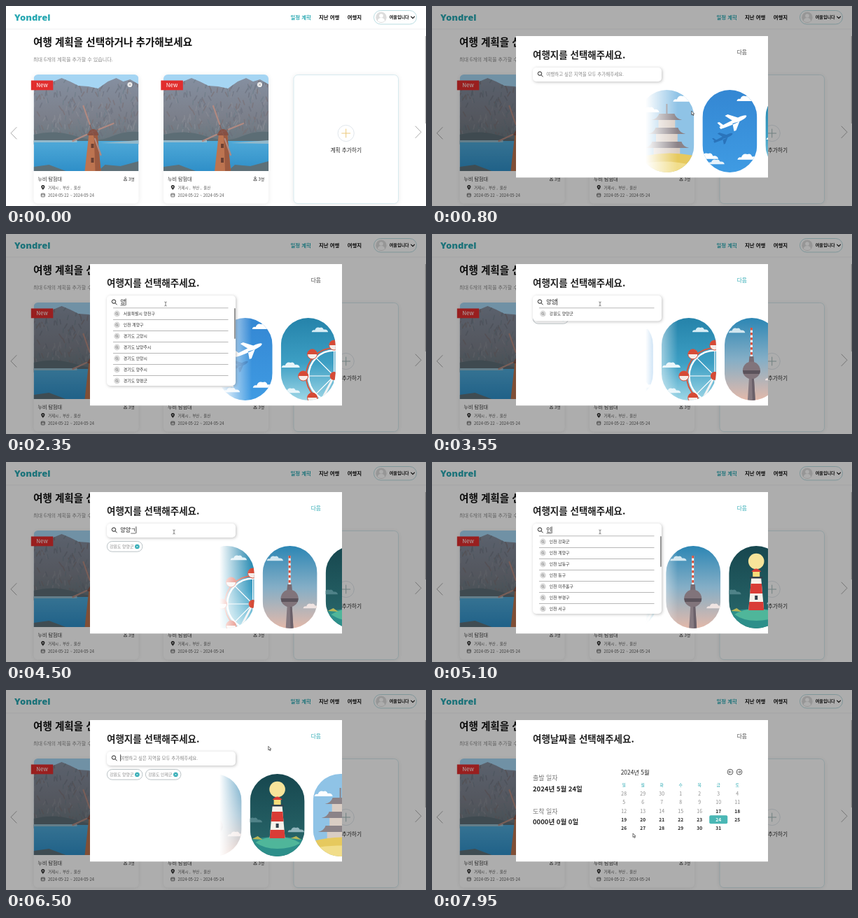
An HTML page for the animation above (8 s loop, 600x286 px).

```html
<!DOCTYPE html>
<html lang="ko">
<head>
<meta charset="utf-8">
<title>여행 계획</title>
<style>
  html, body { margin: 0; width: 100%; height: 100%; overflow: hidden; background: #fff; }
  svg { display: block; width: 100%; height: 100%; }
  text { font-family: 'Noto Sans CJK KR', 'Noto Sans CJK', 'Noto Sans', sans-serif; white-space: pre; }
  .logo { font-family: 'Open Sans', 'Noto Sans', sans-serif; }
  .card { filter: drop-shadow(0 1px 3px rgba(0, 0, 0, .09)); }
  .field { filter: drop-shadow(1px 1px 2px rgba(0, 0, 0, .25)); }
</style>
</head>
<body>
<svg viewBox="0 0 600 286">
  <defs>
    <linearGradient id="fade"><stop stop-color="#fff"/><stop offset="1" stop-color="#fff" stop-opacity="0"/></linearGradient>
    <linearGradient id="planeSky" x2="0" y2="1"><stop stop-color="#3487d3"/><stop offset="1" stop-color="#3f9be3"/></linearGradient>
    <linearGradient id="wheelSky" x2="0" y2="1"><stop stop-color="#2583aa"/><stop offset=".55" stop-color="#3d9fc4"/><stop offset="1" stop-color="#9ed6e6"/></linearGradient>
    <linearGradient id="towerSky" x2="0" y2="1"><stop stop-color="#2c86b4"/><stop offset=".5" stop-color="#84aec6"/><stop offset="1" stop-color="#e3b9aa"/></linearGradient>
    <linearGradient id="nightSky" x2="0" y2="1"><stop stop-color="#17474f"/><stop offset="1" stop-color="#2a6a6d"/></linearGradient>
    <linearGradient id="hills" x2="0" y2="1"><stop stop-color="#858fa0"/><stop offset=".6" stop-color="#7b7f8a"/><stop offset="1" stop-color="#66757c"/></linearGradient>
    <linearGradient id="water" x2="0" y2="1"><stop stop-color="#4fa9d8"/><stop offset="1" stop-color="#2f8fc8"/></linearGradient>
    <clipPath id="pill"><rect width="78" height="118" rx="39"/></clipPath>
    <clipPath id="track"><rect x="305" y="110" width="175" height="135"/></clipPath>
    <clipPath id="photo"><path d="M0 138V6a6 6 0 0 1 6-6h138a6 6 0 0 1 6 6v132z"/></clipPath>
    <path id="ridge" d="M0 22L14 14 28 10 40 5 52 10 64 16 78 17 92 20 106 10 118 5 128 10 138 7 150 14V100H0z"/>
    <clipPath id="slopes"><use href="#ridge"/></clipPath>
    <path id="cloud" d="M0 8q1-4 5-3q2-6 8-4q4-2 6 3q6-1 7 4z"/>
    <path id="jet" d="M-19 8Q-6 1 11-7q8-3 9-1q0 3-8 7Q-4 7-17 11zM0-1L-11-8l4-2L9-5zM0 3l2 11 3-1 5-13zM-16 8l-6-6 3-1 7 5z"/>
  </defs>
  <g id="page"></g>
  <g id="dialog"></g>
</svg>
<script>
const LOOP = 8000, TICK = 50, OPEN = 400, DATES = 6850, PICK = 7450;
const TEAL = '#2ba9b3';

const text = (x, y, size, str, fill = '#222', weight = 400, anchor = 'start', cls = '') =>
  `<text x="${x}" y="${y}" font-size="${size}" fill="${fill}" font-weight="${weight}" text-anchor="${anchor}" class="${cls}">${str}</text>`;
const rect = (x, y, w, h, fill, rx = 0, extra = '') =>
  `<rect x="${x}" y="${y}" width="${w}" height="${h}" rx="${rx}" fill="${fill}" ${extra}/>`;
const circle = (x, y, r, fill, extra = '') => `<circle cx="${x}" cy="${y}" r="${r}" fill="${fill}" ${extra}/>`;
const path = (d, fill) => `<path d="${d}" fill="${fill}"/>`;
const line = (d, stroke, width = 1) =>
  `<path d="${d}" fill="none" stroke="${stroke}" stroke-width="${width}" stroke-linecap="round" stroke-linejoin="round"/>`;
const at = (x, y, body, scale = 1) => `<g transform="translate(${x} ${y}) scale(${scale})">${body}</g>`;
const use = (id, x, y, fill, scale = 1) => at(x, y, `<use href="#${id}" fill="${fill}"/>`, scale);
const range = n => [...Array(n).keys()];

// ---- Page behind the dialog ----
function ruggedSlopes() {
  let seed = 7;
  const random = () => (seed = seed * 16807 % 2147483647) / 2147483647;
  const tones = ['#6a6f7c', '#8d8f98', '#7a6f72', '#6d7d88'];
  return '<g clip-path="url(#slopes)" opacity=".6">' + range(260).map(i => {
    const x = random() * 150, y = 5 + random() * 88, lean = random() * 8 - 4;
    return line(`M${x.toFixed(1)} ${y.toFixed(1)}l${lean.toFixed(1)} 6`, tones[i % 4], 1.6);
  }).join('') + '</g>';
}

function windmillPhoto() {
  const blades = [[-13, -37], [30, -12], [12, 33], [-28, 13]].map(([x, y]) =>
    line(`M84 82l${x} ${y}`, '#8a5a50', 1) +
    line(`M${84 + x * .3} ${82 + y * .3}L${84 + x} ${82 + y}`, '#b08a82', 2.2)).join('');
  return `<g clip-path="url(#photo)">` +
    rect(0, 0, 150, 138, '#a5d5f3') + use('ridge', 0, 0, 'url(#hills)') + ruggedSlopes() +
    path('M0 86Q30 78 60 88T110 89T150 82V100H0z', '#5c6d75') +
    rect(0, 95, 150, 43, 'url(#water)') +
    path('M0 94h62v3H0zM96 98l54-4v5z', '#93b9cb') +
    path('M92 138l10-9 22 2 26-7v14zM0 132l22-3 24 9H0z', '#5d7078') +
    path('M79 84h12l5 54H73z', '#bd7450') + path('M86 84h5l5 54h-8z', '#9c5a40') +
    path('M77 87q2-9 8-9t8 9z', '#875043') +
    rect(82, 99, 4, 6, '#6a4034') + rect(82, 119, 4, 7, '#6a4034') +
    blades + '</g>';
}

function planCard(x) {
  return at(x, 98,
    rect(0, 0, 150, 184.5, '#fff', 6, 'class="card"') + windmillPhoto() +
    circle(137.5, 14.5, 3.5, '#f4f4f4') + line('M136.200 13.200l2.600 2.600m0-2.600l-2.600 2.600', '#888', .7) +
    rect(-3.7, 8.5, 31.5, 13.8, '#e12d2d') + text(12, 18.4, 8, 'New', '#fff', 500, 'middle') +
    text(6, 152, 7.1, '누비 탐험대', '#333', 500) +
    circle(131, 147.6, 1.2, 'none', 'stroke="#333" stroke-width=".7"') +
    line('M128.800 151.300q0-1.900 2.200-1.900t2.200 1.900z', '#333', .7) +
    text(135.5, 151.5, 5.9, '3명', '#333') +
    path('M13.3 165q-2.6-3-2.6-4.3a2.6 2.6 0 0 1 5.2 0q0 1.3-2.6 4.3z', '#333') + circle(13.3, 160.7, .9, '#fff') +
    text(20.5, 164, 5.4, '거제시 ,  부산 ,  울산', '#555') +
    rect(10.8, 170.2, 5, 4.6, 'none', .6, 'stroke="#444" stroke-width=".8"') + line('M11 172h4.6', '#444', .8) +
    text(20.5, 174.6, 5.8, '2024-05-22 ~ 2024-05-24', '#555'));
}

function page(plusColor) {
  return rect(0, 0, 600, 286, '#fff') + rect(0, 32.5, 600, 1, '#f0f0f2') +
    text(12, 21.3, 13, 'Yondrel', TEAL, 800, 'start', 'logo') +
    text(406.5, 19, 7.4, '일정 계획', TEAL, 700) +
    text(447, 19, 7.4, '지난 여행', '#111', 700) +
    text(487.7, 19, 7.4, '여행지', '#111', 700) +
    rect(525.5, 6.5, 61, 19.5, '#fff', 9.7, 'stroke="#a9d3da" stroke-width=".8"') +
    circle(536, 16.2, 7.7, '#ddd') + circle(536, 14, 2.8, '#fff') + path('M531 21.5q0-4.5 5-4.5t5 4.5q-5 3-10 0z', '#fff') +
    text(547.7, 18.4, 6.1, '여울입니다', '#111', 700) + line('M578.700 15.200l2.400 2.400 2.400-2.400', '#111', 1.2) +
    text(39, 57.2, 14.6, '여행 계획을 선택하거나 추가해보세요', '#111', 700) +
    text(39, 79.4, 7.1, '최대 6개의 계획을 추가할 수 있습니다.', '#8a8a8a') +
    planCard(39.5) + planCard(225) +
    rect(411, 98.5, 149.5, 184, '#fff', 6, 'stroke="#cfe6ec" stroke-width=".8" class="card"') +
    circle(485.7, 182, 11.6, '#fff', 'stroke="#d9e0e6" stroke-width=".8"') +
    line('M479.700 182h12m-6-6v12', plusColor, 1) +
    text(485.7, 209.3, 7.7, '계획 추가하기', '#222', 500, 'middle') +
    line('M15 173.500l-8 8.300 8 8.300M585 172l8 8.300-8 8.300', '#aaa', 1) +
    rect(598.8, 43, 1.2, 125, '#bdbdbd');
}

// ---- Carousel of round cards ----
const pagodaTier = i => {
  const y = 34 + 20 * i, w = 17 + 5 * i;
  return rect(39 - w * .7, y + 8, w * 1.4, 12, '#d9cdc4') +
    path(`M${39 - w - 5} ${y + 9}q9-2 11-9h${2 * w - 12}q2 7 11 9z`, '#8b8388');
};
const scenes = [
  () => rect(0, 0, 78, 118, '#8fc3e6') + use('cloud', 48, 8, '#fff', 1.1) + use('cloud', 2, 24, '#fff') +
    rect(38, 20, 2, 16, '#8b8388') + range(3).map(pagodaTier).join('') +
    path('M0 96q39-10 78-2v24H0z', '#e6c95e') + path('M0 106q39-8 78 2v10H0z', '#f1dd8a'),
  () => rect(0, 0, 78, 118, 'url(#planeSky)') + use('cloud', 49, 8, '#fff') + use('cloud', -6, 90, '#fff', 1.1) +
    use('cloud', 8, 99, '#e6f2fb', .9) + use('cloud', 50, 91, '#fff', 1.1) +
    use('jet', 29, 68, '#2a74bb', .7) + use('jet', 43, 45, '#fff'),
  () => rect(0, 0, 78, 118, 'url(#wheelSky)') + use('cloud', 44, 13, '#d7edf5', .9) + use('cloud', 1, 63, '#e7f5fa') +
    use('cloud', 4, 100, '#e7f5fa', .9) +
    line('M76 83L58 118', '#f3f3f3', 3) +
    circle(76, 83, 40, 'none', 'stroke="#d8563f" stroke-width="2"') +
    circle(76, 83, 36.5, 'none', 'stroke="#fff" stroke-width="2.5"') +
    range(8).map(i => {
      const a = i * Math.PI / 4, c = Math.cos(a), s = Math.sin(a);
      return line(`M76 83L${76 + 38 * c} ${83 + 38 * s}`, '#fff', 1.2) +
        at(76 + 44 * c, 83 + 44 * s, circle(0, 0, 7, '#f6ece8', 'stroke="#d64a36" stroke-width="1"') + path('M-7 0a7 7 0 0 1 14 0z', '#d64a36'));
    }).join('') + circle(76, 83, 6, '#d64a36'),
  () => rect(0, 0, 78, 118, 'url(#towerSky)') + use('cloud', 6, 14, '#d2e6ef', .9) + use('cloud', 58, 82, '#f0e4e2', .9) +
    rect(37, 14, 3, 42, '#fff') + range(6).map(i => rect(37, 14 + i * 7, 3, 3.6, '#d5523f')).join('') +
    path('M35.5 55h6l1 11h-8z', '#776b73') + circle(38.5, 75, 12.5, '#81747b') +
    path('M26 75h25a12.5 12.5 0 0 1-1 5H27z', '#5b525b') +
    path('M35 87h7l2 31H33z', '#857980') + path('M39 87h3l2 31h-4z', '#6a6069'),
  () => rect(0, 0, 78, 118, 'url(#nightSky)') + circle(39, 22, 11.3, '#f7e49a') +
    use('cloud', 54, 76, '#8fb3ba', .9) + use('cloud', -6, 62, '#4f8288', .9) +
    path('M0 94q39-8 78 0v24H0z', '#2d8f8a') + path('M8 98q12-8 31-8t33 9q-14 8-33 8T8 98z', '#4fb69a') +
    path('M3 93l8-4 7 5zM58 92l8-3 7 5z', '#b9b657') +
    path('M32 46h14l4 46H28z', '#f6f1ea') + path('M31.3 54h15.4l1.2 14H30zM29 80h20l1 12H28z', '#d93c36') +
    rect(30, 44, 18, 2.5, '#333f4b') + rect(34, 37, 10, 7, '#f7dc7a') + path('M32 37q7-9 14 0z', '#d93c36') +
    rect(37, 71, 4, 6, '#35414d')
];
document.querySelector('defs').insertAdjacentHTML('beforeend',
  scenes.map((draw, i) => `<g id="scene${i}" clip-path="url(#pill)">${draw()}</g>`).join(''));

function carousel(t) {
  const left = 318 - .054 * (t - OPEN);
  return '<g clip-path="url(#track)">' +
    range(7).map(i => use(`scene${i % 5}`, left + 90 * i, 120, 'none')).join('') +
    rect(305, 118, 46, 122, 'url(#fade)') + '</g>';
}

// ---- Place search ----
const single = place => [`강원도 ${place}`];
const results = {
  양: ['서울특별시 양천구', '인천 계양구', '경기도 고양시', '경기도 남양주시', '경기도 안양시', '경기도 양주시', '경기도 양평군'],
  양양: single('양양군'),
  인: ['인천 강화군', '인천 계양구', '인천 남동구', '인천 동구', '인천 미추홀구', '인천 부평구', '인천 서구'],
  인제: single('인제군')
};
// [time, value, composing]
const typing = [
  [1200, ''], [1800, 'ㅇ', 1], [1900, '야', 1], [2000, '양', 1], [2550, '양ㅇ', 1], [2650, '양야', 1], [2750, '양양', 1],
  [3250, '양양'], [4400, '양양ㄱ', 1], [4600, '양양'], [4700, '양'], [4800, ''], [4850, 'ㅇ', 1], [4950, '이', 1],
  [5050, '인', 1], [5130, '인ㅈ', 1], [5200, '인제', 1], [6050, '']
];
const chips = [[3250, '강원도 양양군'], [6000, '강원도 인제군']];

function chip(label, i) {
  const x = 144.4 + i * 55;
  return rect(x, 113.5, 50.5, 14.7, '#fff', 7.3, 'stroke="#aab4b8" stroke-width=".8"') +
    text(x + 3.8, 123, 5.9, label, '#888') +
    circle(x + 43, 121, 3.3, TEAL) + line(`M${x + 41.8} 119.800l2.400 2.400m0-2.400l-2.400 2.400`, '#fff', .7);
}

function searchField(t) {
  const [since, value, composing] = typing.findLast(e => e[0] <= t) || [Infinity, ''];
  const rows = results[value] || [];
  const end = 163.3 + value.length * 7.4;
  let out = rect(144, 88, 184, rows.length ? 20.5 + 16 * rows.length - (rows.length > 1 ? 3.5 : 0) : 20, '#fff', 5, 'class="field"') +
    circle(154, 96.6, 2.7, 'none', 'stroke="#222" stroke-width="1"') + line('M156 98.700l2.300 2.300', '#222', 1);
  out += value ? text(163.3, 100.3, 8, value, '#222') : text(163.3, 99.9, 6.5, '여행하고 싶은 지역을 모두 추가해주세요.', '#858585');
  if (composing) out += rect(end - 7.2, 101.7, 7, .7, '#333');
  if (t >= since && (t - since) % 1000 < 500) out += rect(end, 92.3, .8, 9.6, '#222');
  if (rows.length) out += rect(153, 105.5, 164.5, .7, '#999');
  rows.forEach((place, i) => {
    const y = 114 + 16 * i;
    out += circle(158.5, y, 4.4, '#dcdcdc') + circle(158.2, y - .3, 1.5, 'none', 'stroke="#777" stroke-width=".6"') +
      line(`M159.300 ${y + .8}l1.300 1.300`, '#777', .6) + text(167.8, y + 2.2, 5.9, place, '#333', 500);
    if (i < rows.length - 1) out += rect(153, y + 8, 164.5, .7, '#999');
  });
  return rows.length > 1 ? out + rect(326, 106, 1.8, 44, '#8c8c8c', .9) : out;
}

function placeStep(t) {
  const picked = chips.filter(c => c[0] <= t);
  return text(144, 74.5, 13.5, '여행지를 선택해주세요.', '#222', 700) +
    text(435.7, 68.9, 7.6, '다음', picked.length ? TEAL : '#444', 500) +
    carousel(t) + picked.map((c, i) => chip(c[1], i)).join('') + searchField(t);
}

// ---- Date picker ----
function calendar(picked) {
  const columnX = i => 274.2 + 27 * i;
  const heads = [...'일월화수목금토'].map((d, i) => text(columnX(i), 138, 5.8, d, TEAL, 400, 'middle'));
  const days = range(34).map(i => {
    const day = i < 3 ? 28 + i : i - 2, x = columnX(i % 7), y = 149 + 12.05 * Math.floor(i / 7);
    const chosen = picked && i === 26, open = i >= 19;
    return (chosen ? rect(x - 13, y - 6, 26, 12, '#4ab7b5', 2) : '') +
      text(x, y + 2.4, open ? 6.6 : 6.9, day, chosen ? '#fff' : open ? '#222' : '#8a8a8a', open ? 700 : 400, 'middle');
  });
  return text(269.7, 121, 8.4, '2024년 5월', '#222', 500) +
    [[426, -1], [439, 1]].map(([x, s]) => circle(x, 117.2, 3.9, 'none', 'stroke="#333" stroke-width=".8"') +
      line(`M${x - 2 * s} 117.200h${4 * s}l${-1.6 * s}-1.600m${1.6 * s} 1.600l${-1.6 * s} 1.600`, '#333', .7)).join('') +
    heads.join('') + days.join('');
}

function dateStep(t) {
  const picked = t >= PICK, blank = '0000년 0월 0일';
  return text(144, 74.5, 13.5, '여행날짜를 선택해주세요.', '#222', 700) + text(435.7, 68.9, 7.6, '다음', '#444', 500) +
    text(144, 129, 9, '출발 일자', '#777', 500) + text(144, 145, 9.5, picked ? '2024년 5월 24일' : blank, '#222', 700) +
    text(144, 177, 9, '도착 일자', '#777', 500) + text(144, 192.3, 9.5, blank, '#222', 700) +
    calendar(picked);
}

// ---- Pointer ----
const stops = [
  [400, 484, 190], [500, 484, 190], [1150, 228, 100], [2950, 228, 100], [3150, 240, 114], [3250, 240, 114], [3400, 240, 100],
  [5450, 240, 100], [5650, 230, 129], [5800, 230, 129], [5950, 216, 114], [6150, 216, 114], [6700, 443, 66],
  [6900, 443, 66], [7350, 408, 184], [7550, 408, 184], [7900, 287, 205], [8000, 287, 205]
];
function pointer(t) {
  const n = stops.findIndex(s => s[0] > t), [t0, x0, y0] = stops[n - 1], [t1, x1, y1] = stops[n];
  const u = (t - t0) / (t1 - t0), k = u * u * (3 - 2 * u);
  const x = x0 + (x1 - x0) * k, y = y0 + (y1 - y0) * k;
  const overField = t < DATES && x > 160 && x < 328 && y > 89 && y < 106;
  return at(x, y, overField
    ? line('M-1.300-3q1.300 0 1.300 1v4q0 1-1.300 1M1.300-3q-1.300 0-1.300 1M0 2q0 1 1.300 1', '#555', .7)
    : '<path d="M0 0v5.500l1.300-1.100 1 2.100 1-.5-1-2h1.700z" fill="#fff" stroke="#333" stroke-width=".7"/>');
}

const pageLayer = document.getElementById('page'), dialogLayer = document.getElementById('dialog');
let lastTime = -1, wasOpen;

function frame(now) {
  const t = Math.floor(now % LOOP / TICK) * TICK, open = t >= OPEN;
  if (open !== wasOpen) pageLayer.innerHTML = page(open ? '#a3bcbc' : '#ecc97c');
  if (t !== lastTime) dialogLayer.innerHTML = open
    ? rect(0, 0, 600, 286, '#000', 0, 'opacity=".32"') + rect(120, 43, 360, 202.3, '#fff') +
      (t < DATES ? placeStep(t) : dateStep(t)) + pointer(t)
    : '';
  lastTime = t;
  wasOpen = open;
  requestAnimationFrame(frame);
}
frame(0);
</script>
</body>
</html>
```
